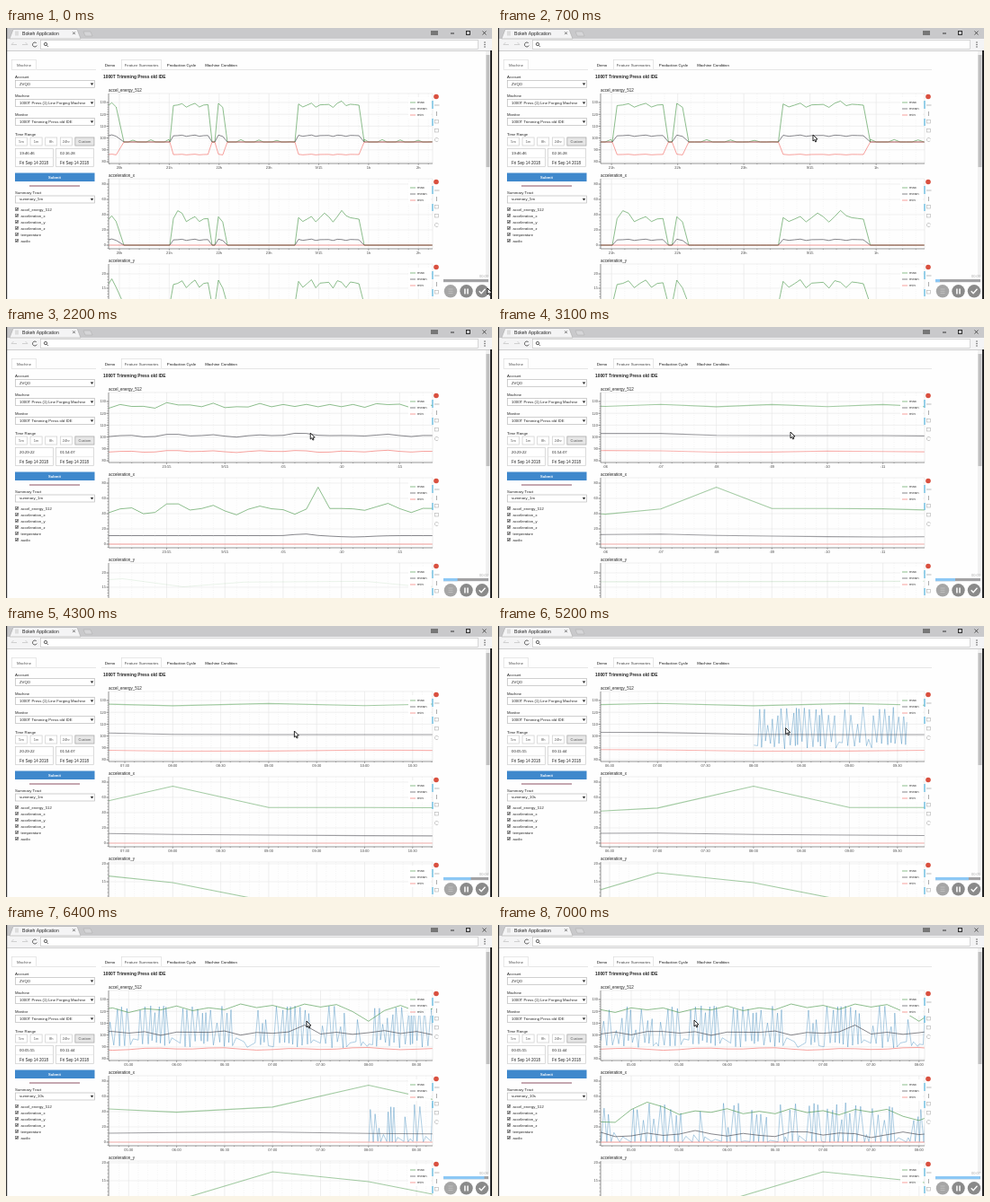
An HTML page with a canvas that plays this animation: 540x302 px, repeating every 7100 ms.

```html
<!DOCTYPE html>
<html lang="en">
<head>
<meta charset="utf-8">
<title>Machine dashboard</title>
<style>
html, body { margin: 0; width: 100%; height: 100%; overflow: hidden; background: #fff; }
canvas { display: block; width: 540px; height: 302px; }
</style>
</head>
<body>
<canvas id="stage" width="540" height="302"></canvas>
<script>
const ctx = document.getElementById('stage').getContext('2d');
const LOOP = 7100, LEFT = 114, RIGHT = 474;
const COLORS = ['#3f923f', '#34343c', '#f2605a'], BLUE = '#1f77b4';
const SANS = '"Liberation Sans", Arial, sans-serif';

// The time axis: pixels per minute and the x of midnight
const WIDE = { scale: .923, zero: 347.5 };
const MOVES = [
  { from: 500, to: 1400, scale: 3.3, zero: 341 },
  { from: 1500, to: 3000, scale: 61.7, zero: -251 },
  { from: 3300, to: 4200, scale: 106.6, zero: -667.5 },
  { from: 4800, to: 5400, scale: 106.6, zero: -519.6 },
  { from: 6000, to: 6400, scale: 106.6, zero: -450 },
  { from: 6700, to: 7000, scale: 106.6, zero: -385 }
];
// [time, x, y]
const POINTER = [
  [0, 537, 293], [600, 352, 122], [1400, 352, 122], [3100, 327, 120], [4400, 322, 120], [4800, 223, 118],
  [5400, 371, 116], [6000, 266, 112], [6400, 336, 110], [6700, 155, 109], [7000, 220, 109]
];

const mix = (a, b, k) => a + (b - a) * k;
const progress = (from, to, t) => Math.max(0, Math.min(1, (t - from) / (to - from)));

function viewAt(t) {
  let view = WIDE;
  for (const move of MOVES) {
    const k = progress(move.from, move.to, t);
    const scale = view.scale * Math.pow(move.scale / view.scale, k);
    // zooming keeps one point of the axis fixed
    const part = move.scale === view.scale ? k : (scale - view.scale) / (move.scale - view.scale);
    view = { scale, zero: mix(view.zero, move.zero, part) };
  }
  return view;
}

function random(seed) {
  return () => (seed = (seed * 16807) % 2147483647) / 2147483647;
}
const wobble = m => Math.sin(m * 1.7) * .6 + Math.sin(m * .73 + 1) * .4;
const bump = (m, center, width) => Math.exp(-(((m - center) / width) ** 2));

// Series are lists of [minute, y]
function sample(from, to, step, fn) {
  const out = [];
  for (let i = 0; from + i * step <= to; i++) out.push([from + i * step, fn(from + i * step)]);
  return out;
}
const level = y => [[-400, y], [400, y]];

// Runs of the machine, as pixel spans of the widest view
const RUNS = [[108, 127], [186, 225], [236, 242], [325, 394]];
function runs(idle, busy) {
  const out = [];
  const add = (x, y) => out.push([(x - WIDE.zero) / WIDE.scale, y]);
  let last = 100;
  for (const [a, b] of RUNS) {
    for (let x = last; x < a - 4; x += 5) add(x, idle(x));
    add(a - 4, idle(0));
    for (let x = a; x <= b; x += 4.8) add(x, busy(x));
    last = b + 4;
    add(last, idle(0));
  }
  for (let x = last; x < 490; x += 5) add(x, idle(x));
  return out;
}

// Once a minute: idle, then busy with one short break
const START = -24, BREAK = -18;
function minutely(idle, busy) {
  return [[-400, idle], ...sample(START, 120, 1, m => m === START || m === BREAK ? idle : busy(m))];
}
const perTenSeconds = fn => sample(14 / 3, 9.2, 1 / 6, fn);

// Spiky sensor signal with short quiet spells
function spikes(seed, floor, top, depth, lift) {
  const next = random(seed), out = [];
  for (let m = 4.4; m < 9.6;) {
    out.push([m, floor - next() * lift]);
    m += .01 + next() * .03;
    const quiet = next() < .15;
    out.push([m, quiet ? floor - 12 * next() : top + depth * next() * next()]);
    m += .01 + next() * (quiet ? .08 : .03);
  }
  return out;
}

const idleBumps = x => 127 - 3 * Math.max(0, Math.sin(x * .32)) ** 4;
const calm = m => 1 - bump(m, 8, 5);

const energy = {
  coarse: [
    runs(idleBumps, x => 86 + 3 * wobble(x) - 4 * bump(x, 374, 4)),
    runs(() => 127, x => 120 + wobble(x)),
    runs(() => 127, x => 141 + .5 * wobble(x))
  ],
  minute: [
    minutely(127, m => 87.6 + 1.3 * Math.cos(m * Math.PI) + calm(m) * (3 * wobble(m) - 3 * bump(m, 27, 8))),
    minutely(127, m => 121 - 3 * bump(m, 6.5, 1) + calm(m) * 2 * wobble(m)),
    minutely(127, m => 138.6 + 1.3 * wobble(m))
  ],
  fine: [
    perTenSeconds(m => 94.5 - 4 * bump(m, 7.2, 1) + 4 * wobble(m * 11) + 16 * bump(m, 8, .1)),
    perTenSeconds(m => 120 + 3 * wobble(m * 9) - 6 * bump(m, 7.33, .1)),
    perTenSeconds(m => 138 + 1.6 * wobble(m * 5))
  ],
  raw: spikes(71, 137, 90, 34, 9)
};

const accelX = {
  coarse: [
    runs(() => 242, x => 213 + 4 * wobble(x) - 11 * bump(x, 375, 4) - 6 * bump(x, 354, 4) - 10 * bump(x, 192, 4)),
    runs(() => 242, x => 236 + wobble(x)),
    level(242)
  ],
  minute: [
    minutely(242, m => 202.5 + 7 * bump(m, 6, .7) - 24 * bump(m, 8, .5) + calm(m) * 8 * wobble(m)),
    minutely(242, m => 232.5 - 2 * bump(m, 6.7, 1) + 1.5 * bump(m, 11, 2)),
    level(242)
  ],
  fine: [
    perTenSeconds(m => 208 + 4 * wobble(m * 11) + 12 * bump(m, 4.7, .25) - 11 * bump(m, 5.17, .15) + 11 * bump(m, 8, .12)),
    perTenSeconds(m => 233 + 4 * wobble(m * 7)),
    level(242)
  ],
  raw: spikes(39, 242, 198, 38, 1)
};

const accelY = {
  coarse: [runs(() => 308, x => 285 + 6 * wobble(x)), [], []],
  minute: [minutely(308, m => 307 - 32 * bump(m, 7, .4) - 21 * bump(m, 8, .4)), [], []]
};

const CHARTS = [
  { name: 'accel_energy_512', data: energy, minuteAt: 1300, fineAt: 5800, rawAt: 5200, first: 130, drop: 10, count: 6, tickY: 83, gap: 13.2 },
  { name: 'acceleration_x', data: accelX, minuteAt: 1700, fineAt: 6600, rawAt: 6300, first: 80, drop: 20, count: 5, tickY: 174, gap: 17 },
  { name: 'acceleration_y', data: accelY, minuteAt: 3300, fineAt: Infinity, rawAt: Infinity, first: 20, drop: 5, count: 2, tickY: 274, gap: 16 }
];

function text(s, x, y, size = 4.3, color = '#222', align = 'left', weight = '') {
  ctx.font = `${weight} ${size}px ${SANS}`;
  ctx.fillStyle = color;
  ctx.textAlign = align;
  ctx.fillText(s, x, y);
}
function rect(x, y, w, h, fill) {
  ctx.fillStyle = fill;
  ctx.fillRect(x, y, w, h);
}
function box(x, y, w, h, stroke = '#ccc', fill = '#fff') {
  rect(x, y, w, h, fill);
  ctx.strokeStyle = stroke;
  ctx.lineWidth = .7;
  ctx.strokeRect(x + .5, y + .5, w - 1, h - 1);
}
function path(points, color, width = .7, fill) {
  ctx.beginPath();
  points.forEach(([x, y], i) => i ? ctx.lineTo(x, y) : ctx.moveTo(x, y));
  if (fill) {
    ctx.closePath();
    ctx.fillStyle = fill;
    ctx.fill();
  }
  ctx.strokeStyle = color;
  ctx.lineWidth = width;
  ctx.stroke();
}
function disc(x, y, r, fill) {
  ctx.beginPath();
  ctx.arc(x, y, r, 0, 7);
  ctx.fillStyle = fill;
  ctx.fill();
}
function ring(x, y, r, color, from = 0, to = 7) {
  ctx.beginPath();
  ctx.arc(x, y, r, from, to);
  ctx.strokeStyle = color;
  ctx.lineWidth = .8;
  ctx.stroke();
}
function cross(x, y, r, color) {
  path([[x - r, y - r], [x + r, y + r]], color);
  path([[x + r, y - r], [x - r, y + r]], color);
}

function browser() {
  rect(0, 0, 540, 302, '#fefefe');
  rect(0, 0, 540, 12, '#c9c9cb');
  rect(0, 12, 540, 13, '#f4f4f5');
  path([[4, 12], [8, 1.5], [79, 1.5], [83, 12]], '#aaa', .6, '#f4f4f5');
  path([[86, 4], [94, 4], [96, 9], [88, 9]], '#aaa', .5, '#d6d6d8');
  rect(10, 3.5, 4, 5, '#ddd');
  text('Bokeh Application', 18, 8, 5.1);
  cross(75.5, 5.7, 1.4, '#444');
  rect(472, 3, 8, 5, '#777');
  path([[494, 6], [498, 6]], '#222', .9);
  ctx.strokeRect(511.5, 3.5, 4, 4);
  cross(531.5, 5.5, 2, '#222');
  path([[12, 18.5], [6, 18.5], [8.5, 16]], '#ccc', .9);
  path([[18, 18.5], [24, 18.5], [21.5, 16]], '#ccc', .9);
  ring(32, 18.5, 2.5, '#444', .4, 5.6);
  box(38, 13, 487, 11, '#c4c4c4');
  ring(44, 18, 1.7, '#444');
  path([[45.3, 19.3], [47, 21]], '#444');
  for (const y of [16, 18.5, 21]) disc(532, y, .7, '#444');
  rect(0, 25, 540, .7, '#bbb');
  rect(0, 0, 1.2, 302, '#333');
  rect(533, 26, 5, 276, '#f1f1f1');
  rect(533.5, 30, 4, 125, '#c1c1c1');
  rect(538, 25, 2, 277, '#222');
}

function select(label, value, y) {
  text(label, 10, y);
  box(10, y + 2, 89, 9, '#bbb');
  text(value, 15, y + 7.9);
  path([[94, y + 5.5], [97, y + 5.5], [95.5, y + 7.8]], '#222', .2, '#222');
}

function sidebar(t) {
  rect(6, 46, 94, .7, '#ddd');
  box(6, 35, 28, 12, '#ddd');
  text('Machine', 20, 42.5, 4.3, '#555', 'center');
  select('Account', 'ZVQO', 56);
  select('Machine', '1000T Press (1) Line Forging Machine', 77);
  select('Monitor', '1000T Trimming Press old IDE', 98);
  text('Time Range', 10, 120);
  ['5m', '1m', '8h', '24hr', 'Custom'].forEach((s, i) => {
    const x = 10 + i * 16.6, w = i === 4 ? 22 : 14;
    box(x, 121.5, w, 10, i === 4 ? '#aaa' : '#ccc', i === 4 ? '#e6e6e6' : '#fff');
    text(s, x + w / 2, 128, 4, '#555', 'center');
  });
  const [start, end, tract] = t < 1200 ? ['19:46:46', '02:16:28', '5m']
    : t < 4900 ? ['20:29:22', '01:54:07', '1m'] : ['00:05:55', '00:11:44', '10s'];
  [[10, start], [55, end]].forEach(([x, time]) => {
    box(x, 134, 43, 21);
    rect(x, 144.5, 43, .6, '#ddd');
    text(time, x + 5, 141.3);
    text('Fri Sep 14 2018', x + 5, 151.5, 4.5);
  });
  rect(10, 161.5, 88.5, 9.5, '#3f88cc');
  text('Submit', 54, 168, 4.1, '#fff', 'center', 'bold');
  rect(26, 175.5, 56, 1, '#8d5264');
  select('Summary Tract', 'summary_' + tract, 184.5);
  ['accel_energy_512', 'acceleration_x', 'acceleration_y', 'acceleration_z', 'temperature', 'audio'].forEach((s, i) => {
    const y = 202 + i * 7;
    box(10, y - 2, 4, 4, '#777', '#eee');
    path([[11, y], [11.8, y + 1], [13.3, y - 1.3]], '#222');
    text(s, 16.5, y + 1.5, 4.2);
  });
}

function header() {
  rect(106, 46, 376, .7, '#ddd');
  box(128, 35, 45, 12, '#ddd');
  text('Demo', 115.5, 42.5, 4.3, '#111', 'center');
  text('Feature Summaries', 150.5, 42.5, 4.3, '#444', 'center');
  text('Production Cycle', 195, 42.5, 4.3, '#111', 'center');
  text('Machine Condition', 239, 42.5, 4.3, '#111', 'center');
  text('1000T Trimming Press old IDE', 108, 56.3, 4.85, '#222', 'left', 'bold');
}

function tickLabel(m, step) {
  const pad = n => String(n).padStart(2, '0');
  const day = (m + 1440) % 1440, hour = Math.floor(day / 60), min = Math.floor(day % 60);
  if (step < 1) return pad(min) + ':' + pad(Math.round(day % 1 * 60));
  if (step < 5) return ':' + pad(min);
  if (day === 0) return '9/15';
  if (step >= 60) return hour + 'h';
  return (hour || '') + ':' + pad(min);
}

function timeGrid(px, view, top, bottom) {
  const step = [.5, 1, 2, 5, 10, 20, 60].find(s => s * view.scale >= 48) || 60;
  const minor = step / 5;
  for (let i = Math.ceil((LEFT - view.zero) / view.scale / minor); px(i * minor) <= RIGHT; i++) {
    const x = px(i * minor), major = i % 5 === 0;
    ctx.setLineDash(major ? [] : [1, 1.5]);
    path([[x, top], [x, bottom]], major ? '#e4e4e4' : '#eee', .6);
    ctx.setLineDash([]);
    path([[x, bottom], [x, bottom + (major ? 2 : 1)]], '#777', .6);
    if (major) text(tickLabel(i * minor, step), x, bottom + 6, 4, '#444', 'center');
  }
}

function valueGrid(c, tickY, gap, bottom) {
  for (let i = 0; i < c.count; i++) {
    const y = tickY + i * gap;
    path([[LEFT, y], [RIGHT, y]], '#e6e6e6', .6);
    path([[LEFT - 2.5, y], [LEFT, y]], '#555', .7);
    text(c.first - i * c.drop, LEFT - 3.2, y + 1.4, 3.8, '#444', 'right');
    for (let k = 1; k < 5; k++) {
      const my = y + k * gap / 5;
      if (my < bottom) path([[LEFT - 1.5, my], [LEFT, my]], '#888', .6);
    }
  }
}

function chart(c, index, t, view) {
  const off = index * 95, top = 73 + off, bottom = 151 + off;
  const px = m => view.zero + m * view.scale;
  const rescaled = index === 2 && t >= c.minuteAt;
  text(c.name, LEFT, top - 2, 4.5);
  timeGrid(px, view, top, bottom);
  valueGrid(c, rescaled ? 265 : c.tickY, rescaled ? 20 : c.gap, bottom);

  const fine = t >= c.fineAt;
  const series = fine ? c.data.fine : t >= c.minuteAt ? c.data.minute : c.data.coarse;
  const stale = t >= 1100 && t < c.minuteAt;
  const pale = view.scale > 20 && !fine;
  ctx.save();
  ctx.beginPath();
  ctx.rect(LEFT, top, RIGHT - LEFT, bottom - top);
  ctx.clip();
  const plot = (points, color, width) => path(points.map(([m, y]) => [px(m), y]), color, width);
  if (t >= c.rawAt) {
    ctx.globalAlpha = .65;
    plot(c.data.raw.filter(p => fine || p[0] >= 8), BLUE, .55);
  }
  series.forEach((points, i) => {
    ctx.globalAlpha = stale && (i || index === 2) ? .15 : pale ? .48 : .85;
    plot(points, COLORS[i], pale ? 1.1 : .7);
  });
  ctx.restore();

  path([[LEFT, top], [RIGHT, top], [RIGHT, bottom]], '#e2e2e2', .6);
  path([[LEFT, top], [LEFT, bottom], [RIGHT, bottom]], '#666', .7);
  rect(447, 77 + off, 25, 24, 'rgba(255,255,255,.93)');
  ['max', 'mean', 'min'].forEach((s, i) => {
    const y = 83 + off + i * 7;
    path([[449, y], [455, y]], COLORS[i], .6);
    text(s, 457, y + 1.3, 4.2, '#333');
  });
  tools(off);
}

function tools(off) {
  disc(478, 76.5 + off, 2.8, '#d9503f');
  rect(473.5, 81 + off, 1, 9, '#36a9dc');
  rect(473.5, 101 + off, 1, 8, '#36a9dc');
  path([[476, 86 + off], [481.5, 86 + off]], '#aaa', .8);
  path([[478.5, 93 + off], [478.5, 98 + off]], '#999', .8);
  box(476, 102 + off, 5, 4.5, '#bbb');
  box(476, 112 + off, 5, 4.5, '#bbb');
  ring(478.5, 124.5 + off, 2.1, '#bbb', .5, 6);
}

function recorder(t) {
  rect(485, 277, 52, 25, 'rgba(255,255,255,.8)');
  rect(486, 280, 50, 3.2, '#a2a2a4');
  rect(486, 280, Math.min(50, t * .0071), 3.2, '#8cc8f5');
  text('00:0' + Math.floor(t / 1000), 536, 277.5, 4, '#aaa', 'right');
  disc(494, 293.3, 7.2, '#a6a6a6');
  disc(511.5, 293.3, 7.2, '#8a8a8a');
  disc(529, 293.3, 7.2, '#8a8a8a');
  for (const y of [291, 293.3, 295.6]) path([[491.5, y], [496.5, y]], '#c4c4c4', .8);
  rect(509.2, 290.5, 1.5, 6, '#fff');
  rect(512.3, 290.5, 1.5, 6, '#fff');
  path([[525.7, 293.3], [528.1, 295.8], [532.5, 290.8]], '#fff', 1.3);
}

function pointer(t) {
  const i = Math.max(1, POINTER.findIndex(p => p[0] >= t));
  const a = POINTER[i - 1], b = POINTER[i], k = progress(a[0], b[0], t);
  const x = mix(a[1], b[1], k) - 2, y = mix(a[2], b[2], k) - 3;
  const shape = [[0, 0], [0, 7], [1.6, 5.6], [2.7, 8], [3.8, 7.5], [2.8, 5.2], [5, 5]];
  path(shape.map(([dx, dy]) => [x + dx, y + dy]), '#111', .9, '#fff');
}

function draw(now) {
  const t = Math.floor(now % LOOP / 100) * 100;
  const view = viewAt(t);
  browser();
  sidebar(t);
  header();
  CHARTS.forEach((c, i) => chart(c, i, t, view));
  recorder(t);
  pointer(t);
}

const started = performance.now();
function tick() {
  draw(performance.now() - started);
  requestAnimationFrame(tick);
}
tick();
</script>
</body>
</html>
```
